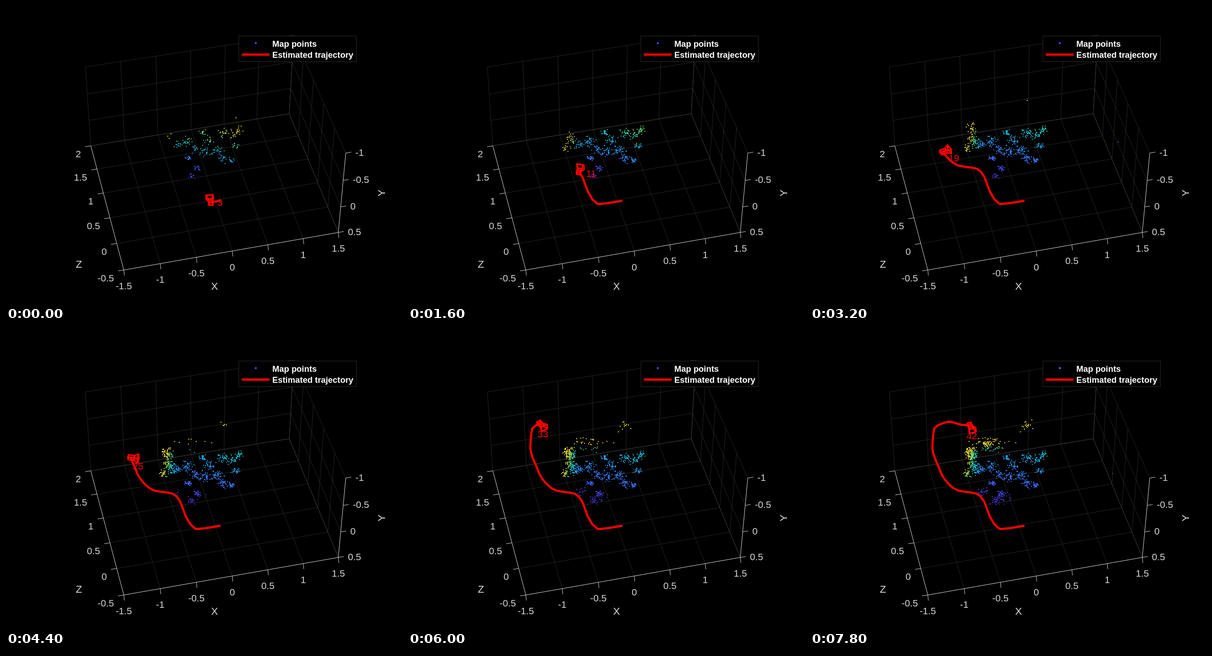
An HTML page with a canvas for the animation above (8000 ms loop, 864 px wide and 648 px high).

```html
<!DOCTYPE html>
<html lang="en">
<head>
<meta charset="utf-8">
<title>Map points and trajectory</title>
<style>
html, body { margin: 0; width: 100%; height: 100%; overflow: hidden; background: #000; }
canvas { display: block; }
</style>
</head>
<body>
<canvas id="stage" width="864" height="648"></canvas>
<script>
const ctx = document.getElementById('stage').getContext('2d');
const LOOP = 8000, STEP = 200, FIRST = 3, LAST = 42;
const FONT = '"Liberation Sans", Arial, sans-serif';
const RED = '#f00', LIGHT = '#d6d6d6', GRID = '#262626', EDGE = '#343434';

const clamp = v => Math.min(1, Math.max(0, v));
const lerp = (a, b, u) => a + (b - a) * u;
const ease = u => u * u * (3 - 2 * u);
const range = (from, to) => Array.from({ length: (to - from) * 2 + 1 }, (_, i) => from + i / 2);

function line(pts, color, width = 1, closed = false) {
  ctx.beginPath();
  pts.forEach(p => ctx.lineTo(p[0], p[1]));
  if (closed) ctx.closePath();
  ctx.strokeStyle = color;
  ctx.lineWidth = width;
  ctx.lineJoin = 'round';
  ctx.stroke();
}

// y is the middle of the digit height
function text(str, x, y, align = 'left', size = 20.7, color = LIGHT, weight = '') {
  ctx.font = `${weight} ${size}px ${FONT}`;
  ctx.textAlign = align;
  ctx.fillStyle = color;
  ctx.fillText(str, x, y + size * 0.358);
}

function dot(x, y, color, size = 2) {
  ctx.fillStyle = color;
  ctx.fillRect(x - size / 2, y - size / 2, size, size);
}

// Perspective view of the axes box
function project(X, Y, Z) {
  const x = (X + 1.5) / 3, h = (0.5 - Y) / 1.5, z = (Z + 0.5) / 2.5;
  const w = 1 + 0.023 * x + 0.0865 * z - 0.052 * h;
  return [(257 + 484.7 * x - 56 * z - 21.9 * h) / w, (576 - 70.6 * x - 244.6 * z - 193.9 * h) / w];
}
const segment = (a, b, color) => line([project(...a), project(...b)], color);

function mark([x, y], dx, dy) {
  line([[x, y], [x + dx, y + dy]], LIGHT);
}

function drawAxes() {
  const xs = range(-1.5, 1.5), ys = range(-1, 0.5), zs = range(-0.5, 2);
  zs.forEach(z => {
    segment([-1.5, 0.5, z], [1.5, 0.5, z], GRID);
    segment([1.5, 0.5, z], [1.5, -1, z], GRID);
  });
  xs.forEach(x => {
    segment([x, 0.5, -0.5], [x, 0.5, 2], GRID);
    segment([x, 0.5, 2], [x, -1, 2], GRID);
  });
  ys.forEach(y => {
    segment([-1.5, y, 2], [1.5, y, 2], GRID);
    segment([1.5, y, 2], [1.5, y, -0.5], GRID);
  });
  segment([-1.5, 0.5, 2], [1.5, 0.5, 2], EDGE);
  segment([1.5, 0.5, 2], [1.5, 0.5, -0.5], EDGE);
  segment([1.5, 0.5, 2], [1.5, -1, 2], EDGE);

  segment([-1.5, 0.5, 2], [-1.5, 0.5, -0.5], LIGHT);
  segment([-1.5, 0.5, -0.5], [1.5, 0.5, -0.5], LIGHT);
  segment([1.5, 0.5, -0.5], [1.5, -1, -0.5], LIGHT);

  zs.forEach(z => {
    const p = project(-1.5, 0.5, z);
    mark(p, -12.5, 2);
    text(z, p[0] - 21.5, p[1] + 17.5, 'right');
  });
  xs.forEach(x => {
    const p = project(x, 0.5, -0.5);
    mark(p, 1.3, 12);
    text(x, p[0], p[1] + 34.8, 'center');
  });
  ys.forEach(y => {
    const p = project(1.5, y, -0.5);
    mark(p, 12, -2);
    text(y, p[0] + 21, p[1] - 1.5);
  });

  text('X', 455, 611, 'center', 22.5);
  text('Z', 159, 563, 'center', 22.5);
  ctx.save();
  ctx.translate(819, 408);
  ctx.rotate(-Math.PI / 2);
  text('Y', 0, 0, 'center', 22.5);
  ctx.restore();
}

const MAP = [[62, 38, 168], [68, 90, 250], [46, 135, 247], [18, 171, 226], [24, 191, 182],
  [110, 205, 100], [200, 193, 50], [246, 200, 50], [249, 240, 25]];
function depthColor(v) {
  const u = clamp(v) * (MAP.length - 1), i = Math.min(MAP.length - 2, Math.floor(u));
  return `rgb(${MAP[i].map((c, j) => Math.round(lerp(c, MAP[i + 1][j], u - i)))})`;
}

// Depth grows upwards, to both sides, and jumps behind the upper edge
function depthAt(x, y) {
  return (372 - y) / 300 + Math.max(0, 372 - x) / 65 + Math.max(0, x - 430) / 1000
    + 0.4 * clamp((262 - y) / 16);
}

let seed = 7;
function rnd() {
  seed = (seed * 1664525 + 1013904223) % 4294967296;
  return seed / 4294967296;
}
const bell = () => (rnd() + rnd() + rnd() - 1.5) * 2;

const points = [];
function scatter(cx, cy, rx, ry, count, bornAt) {
  for (let i = 0; i < count; i++) {
    const x = Math.round(cx + bell() * rx), y = Math.round(cy + bell() * ry);
    points.push({ x, y, depth: depthAt(x, y) + bell() * 0.03, born: bornAt(i / count) });
  }
}

// Clumps seen from the start: x, y, radius
[[374, 302, 5], [398, 295, 7], [412, 313, 5], [430, 277, 4], [445, 293, 7], [475, 277, 7],
  [492, 282, 6], [508, 271, 5], [502, 304, 4], [462, 315, 7], [436, 318, 8], [397, 333, 5],
  [417, 354, 4], [475, 333, 6], [490, 336, 4], [404, 371, 4]
].forEach(([x, y, r]) => scatter(x, y, r, r * 0.8, r * 5.5, u => FIRST + Math.max(0, u - 0.5) * 24));

// Clumps that grow later: x, y, radii, count, first step
[[342, 311, 4, 4, 30, 5], [355, 289, 5, 6, 48, 2], [363, 301, 5, 6, 50, 7], [352, 267, 6, 6, 170, 16],
  [384, 248, 6, 4, 95, 33], [395, 243, 24, 5, 42, 21], [469, 205, 9, 7, 18, 19],
  [400, 259, 14, 4, 24, 24], [414, 363, 11, 8, 50, 21], [378, 351, 6, 5, 25, 22]
].forEach(([x, y, rx, ry, n, from]) => scatter(x, y, rx, ry, n, u => from + u * 22));

function drawPoints(k) {
  const scale = 1 + 0.95 * Math.exp((FIRST - k) / 11);
  points.forEach(p => {
    if (p.born <= k) dot(p.x, p.y, depthColor(p.depth * scale));
  });
  if (k < 5) dot(502, 244, depthColor(1));
  // A stray point on the right comes and goes
  if (k > 18 && k % 10 > 7 || k > 37) {
    const u = clamp((k - 19) / 19);
    dot(Math.round(lerp(672, 660, u)), Math.round(lerp(297, 311, u)), depthColor(0.08));
  }
}

// Way points: step, x, y
const WAY = [[1, 468, 425], [6, 414, 432], [8, 392, 404], [10, 380, 372], [12, 364, 355], [15, 323, 348],
  [19, 290, 318], [22, 280, 295], [25, 272, 276], [27, 267, 256], [31, 271, 213], [33, 288, 202],
  [35, 304, 198], [38, 330, 204.5], [42, 349, 206]];

// Monotone cubic through one column of the way points
function along(k, col) {
  const slope = i => (WAY[i + 1][col] - WAY[i][col]) / (WAY[i + 1][0] - WAY[i][0]);
  const tangent = i => {
    if (i === 0) return slope(0);
    if (i === WAY.length - 1) return slope(i - 1);
    const a = slope(i - 1), b = slope(i);
    return a * b <= 0 ? 0 : 2 * a * b / (a + b);
  };
  const i = Math.max(0, WAY.findIndex(p => p[0] >= k) - 1);
  const span = WAY[i + 1][0] - WAY[i][0], u = (k - WAY[i][0]) / span;
  return lerp(WAY[i][col], WAY[i + 1][col], ease(u))
    + span * u * (1 - u) * (tangent(i) * (1 - u) - tangent(i + 1) * u);
}
const path = Array.from({ length: LAST }, (_, i) => [along(i + 1, 1), along(i + 1, 2)]);

function drawCamera([x, y], heading) {
  const s = Math.sin(heading), c = Math.cos(heading);
  const corner = (r, h, f) => {
    const X = r * c + f * s, Z = f * c - r * s;
    return [x + 150 * X - 36 * Z + 8 * h, y - 22 * X - 104 * Z + 112 * h];
  };
  const face = (w, h, f) => [[-1, -1], [1, -1], [1, 1], [-1, 1]].map(([i, j]) => corner(i * w, j * h, f));
  const back = face(.027, .022, -.035), neck = face(.027, .022, .05), front = face(.05, .042, .108);
  [back, neck, front].forEach(q => line(q, RED, 3.2, true));
  neck.forEach((p, i) => line([back[i], p, front[i]], RED, 3.2));
}

function drawLegend(k) {
  ctx.fillStyle = '#000';
  ctx.fillRect(508, 66, 257, 55);
  ctx.strokeStyle = '#2b2b2b';
  ctx.lineWidth = 1;
  ctx.strokeRect(508, 65.5, 256.5, 56);
  const bright = k > 21 && k % 4 === 2;
  dot(545, 81, depthColor(bright ? 0.17 : 0.08), 4);
  line([[514.5, 106], [575, 106]], RED, 5);
  text('Map points', 581, 82, 'left', 18.4, '#fff', 'bold');
  text('Estimated trajectory', 581, 106.5, 'left', 18.4, '#fff', 'bold');
}

function draw(time) {
  const k = FIRST + Math.floor((time % LOOP) / STEP);
  ctx.fillStyle = '#000';
  ctx.fillRect(0, 0, 864, 648);
  drawAxes();
  drawPoints(k);

  const pos = path[k - 1];
  const turn = (6 + 168 * ease(clamp((k - FIRST) / 37))) * Math.PI / 180;
  line(path.slice(0, k), RED, 4.6);
  drawCamera(pos, turn);
  text(k, pos[0] + 3 + 13 * Math.cos(turn - 0.52), pos[1] - 1 + 24 * Math.sin(turn / 2), 'left', 20.7, RED);
  drawLegend(k);
}

const start = performance.now();
function tick() {
  draw(Math.max(0, performance.now() - start));
  requestAnimationFrame(tick);
}
tick();
</script>
</body>
</html>
```
